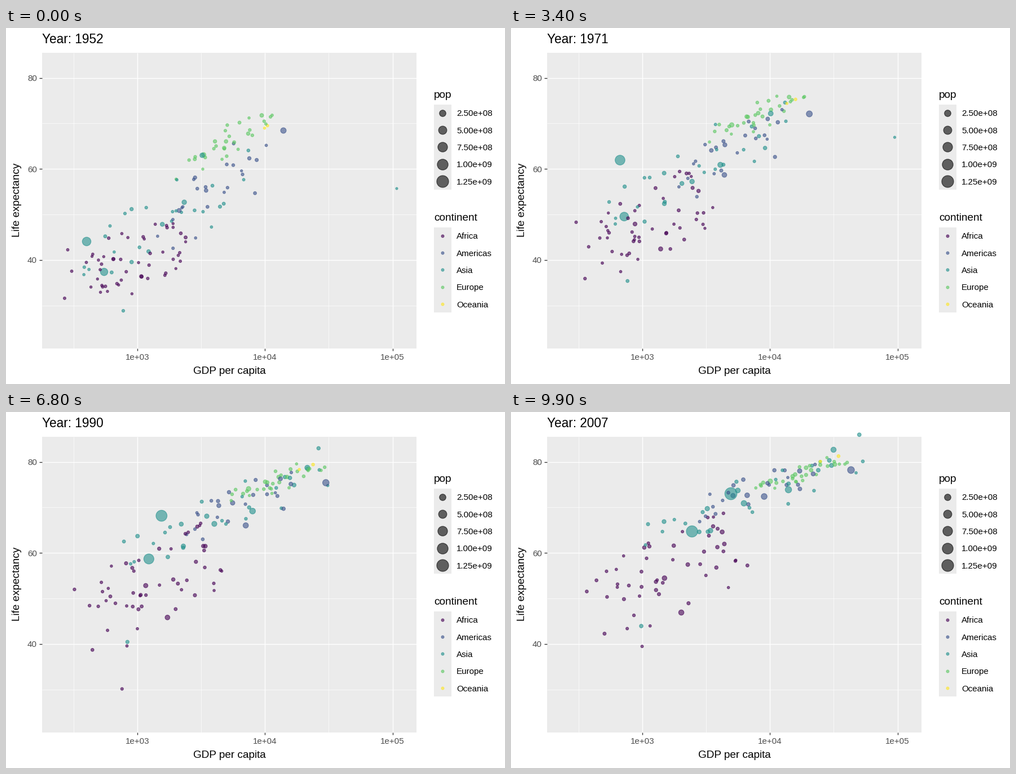
A matplotlib script for the animation above (10000 ms loop, 885 px wide and 632 px high).

```python
import numpy as np
import matplotlib.pyplot as plt
from matplotlib.animation import FuncAnimation
from matplotlib.patches import Rectangle

W, H, DPI = 885, 632, 120
FRAMES, INTERVAL = 100, 100
FIRST, LAST = 1952, 2007
SURVEYS = 12
MAX_POP = 1319
ALPHA = 0.6
SMALL, MEDIUM, LARGE = 9.1, 11.4, 13.6
COLORS = {
    "Africa": "#440154",
    "Americas": "#3B528B",
    "Asia": "#21908C",
    "Europe": "#5DC863",
    "Oceania": "#FDE725",
}

plt.rcParams["font.family"] = ["Liberation Sans", "DejaVu Sans"]
rng = np.random.default_rng(1952)
T = np.linspace(0, 1, FRAMES)


def path(points, t):
    """Straight moves between evenly timed points."""
    points = np.asarray(points, float)
    keys = np.linspace(0, 1, len(points))
    return np.column_stack([np.interp(t, keys, axis) for axis in points.T])


def ease_out(t):
    return 1 - (1 - t) ** 1.6


def dot_size(pop):
    return 1 + 5 * np.sqrt(pop / MAX_POP)


def area(size):
    """Marker area in square points for a dot size in millimetres."""
    return (0.75 * (2.845 * size + 0.94) - 0.6) ** 2


dots = []


def add_dot(continent, pop, growth, points):
    sizes = np.interp(T, (0, 1), dot_size(pop * np.array([1, growth])))
    dots.append((COLORS[continent], path(points, T), area(sizes)))


def add_crowd(continent, count, pop, growth, start, end, spread):
    """Dots strewn along a poor-to-rich line that moves from start to end.

    Wealth grows evenly, life expectancy quickly at first. Each dot drifts
    around its place on the line; spread is (x, y at start, y at end).
    """
    t = np.linspace(0, 1, SURVEYS)
    progress = np.column_stack([t, ease_out(t)])
    scale = path([spread[:2], (spread[0], spread[2])], t)
    start, end = np.array(start), np.array(end)
    for i in range(count):
        u = (i + rng.random()) / count
        a = start[0] + (start[1] - start[0]) * u
        b = end[0] + (end[1] - end[0]) * u
        drift = [rng.uniform(-1.7, 1.7, 2)]
        for _ in range(2):
            drift.append(0.8 * drift[-1] + 0.6 * rng.uniform(-1.6, 1.6, 2))
        wobble = rng.normal(0, 0.12, (SURVEYS, 2))
        track = a + (b - a) * progress + scale * (path(drift, t) + wobble)
        add_dot(continent, min(pop * rng.lognormal(0, 1.1), 80), growth, track)


# The dots that stand out from the crowd
add_dot("Asia", 556, 2.37, [(143, 379), (165, 362), (192, 236), (215, 212),
                            (270, 187), (318, 164), (390, 145)])
add_dot("Asia", 372, 2.98, [(174, 433), (213, 290), (321, 212)])
add_dot("Asia", 86, 1.5, [(348, 226), (512, 118), (572, 67)])
add_dot("Asia", 0.2, 15, [(693, 285), (684, 196), (568, 132), (612, 108)])
add_dot("Asia", 8, 4, [(208, 502), (206, 425), (231, 380)])
add_dot("Americas", 158, 1.9, [(492, 182), (546, 139), (603, 103)])
add_dot("Americas", 57, 3.3, [(307, 324), (411, 232), (449, 150)])
add_dot("Africa", 33, 4, [(240, 441), (277, 370), (302, 356)])
add_dot("Africa", 2.5, 3.5, [(164, 412), (220, 366), (205, 500), (218, 361)])

add_crowd("Africa", 50, 2.6, 3.4, [(128, 437), (320, 382)],
          [(160, 335), (405, 215)], (20, 30, 44))
add_crowd("Americas", 23, 3, 2.8, [(295, 365), (450, 215)],
          [(345, 180), (530, 98)], (17, 34, 14))
add_crowd("Asia", 28, 8, 3, [(140, 408), (405, 275)],
          [(240, 215), (605, 85)], (18, 36, 22))
add_crowd("Europe", 30, 8, 1.3, [(320, 253), (475, 153)],
          [(435, 136), (600, 82)], (14, 11, 7))
add_crowd("Oceania", 2, 4, 2.2, [(457, 178), (468, 173)],
          [(540, 91), (590, 75)], (2, 1, 1))

dots = [dots[i] for i in rng.permutation(len(dots))]
hues = [d[0] for d in dots]
tracks = np.stack([d[1] for d in dots], axis=1)
areas = np.stack([d[2] for d in dots], axis=1)

fig = plt.figure(figsize=(W / DPI, H / DPI), dpi=DPI, facecolor="white")
ax = fig.add_axes([0, 0, 1, 1])
ax.set(xlim=(0, W), ylim=(H, 0))
ax.axis("off")


def box(x, y, w, h):
    ax.add_patch(Rectangle((x, y), w, h, fc="#EBEBEB", ec="none", zorder=0))


def line(x, y, color="white", width=0.8):
    ax.plot(x, y, color=color, lw=width, zorder=1, solid_capstyle="butt")


def label(x, y, text, size=SMALL, color="black", **kw):
    return ax.text(x, y, text, fontsize=size, color=color, va="baseline", **kw)


def scatter(x, y, s, colors):
    return ax.scatter(x, y, s=s, c=colors, alpha=ALPHA, linewidths=0.71,
                      edgecolors=colors, zorder=3)


# Panel, grid and axes
LEFT, RIGHT, TOP, BOTTOM = 64, 728, 43.5, 568.5
DECADE, SCORE = 226.2, 161.6
box(LEFT, TOP, RIGHT - LEFT, BOTTOM - TOP)
for i in range(3):
    x, y = 233.2 + DECADE * i, 88.5 + SCORE * i
    line((x - DECADE / 2,) * 2, (TOP, BOTTOM), width=0.4)
    line((LEFT, RIGHT), (y + SCORE / 2,) * 2, width=0.4)
    line((x, x), (TOP, BOTTOM))
    line((LEFT, RIGHT), (y, y))
    line((x, x), (BOTTOM, BOTTOM + 4.6), "#333333")
    line((LEFT - 4.6, LEFT), (y, y), "#333333")
    label(x, 589, f"1e+0{i + 3}", color="#4D4D4D", ha="center")
    label(55, y + 5.5, str(80 - 20 * i), color="#4D4D4D", ha="right")
label(396, 614, "GDP per capita", MEDIUM, ha="center")
label(24.5, 305, "Life expectancy", MEDIUM, ha="center", rotation=90,
      rotation_mode="anchor")
title = label(LEFT, 27, "", LARGE)


def legend(y, heading, names, sizes, colors):
    step = 30.3
    label(759, y - 11.5, heading, MEDIUM)
    box(759, y, 30.5, step * len(names))
    for i, (text, size, color) in enumerate(zip(names, sizes, colors)):
        cy = y + step * (i + 0.5)
        scatter([774.3], [cy], area(size), [color])
        label(799, cy + 5.8, text)


pops = np.arange(250, 1251, 250)
legend(135.5, "pop", [f"{p * 1e6:.2e}" for p in pops], dot_size(pops), ["black"] * 5)
legend(353.5, "continent", COLORS, [1.3] * 5, COLORS.values())

cloud = scatter(*tracks[0].T, areas[0], hues)


def update(i):
    title.set_text(f"Year: {round(FIRST + (LAST - FIRST) * T[i])}")
    cloud.set_offsets(tracks[i])
    cloud.set_sizes(areas[i])
    return title, cloud


anim = FuncAnimation(fig, update, frames=FRAMES, interval=INTERVAL,
                     repeat=True, repeat_delay=0)
plt.show()
```
